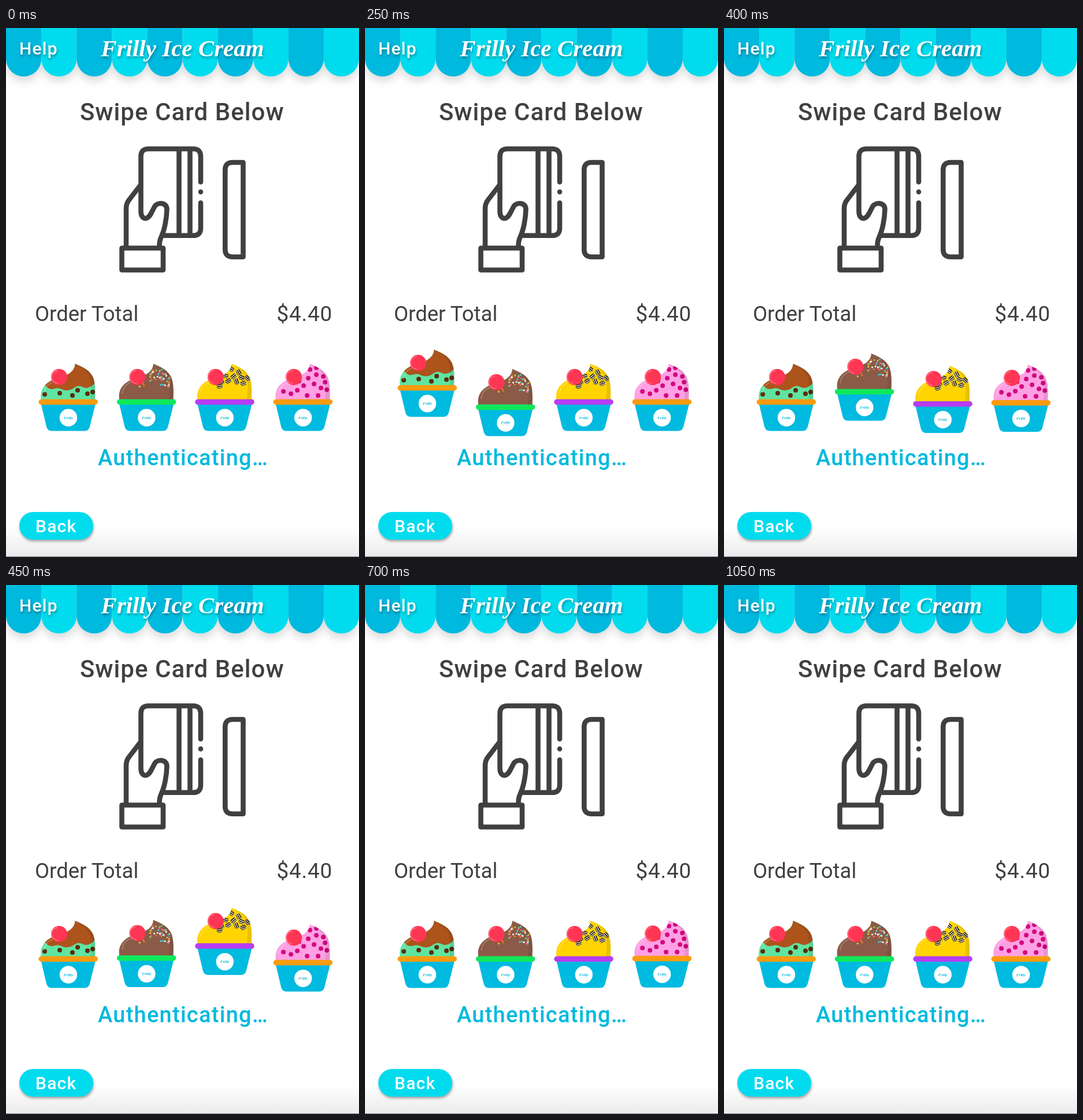
Write an HTML page that moves like this. It is 611 by 917 pixels and loops after 1100 ms.

```html
<!DOCTYPE html>
<html lang="en">
<head>
<meta charset="utf-8">
<title>Ice cream checkout</title>
<style>
html, body { margin: 0; width: 100%; height: 100%; overflow: hidden; background: #fff }
svg { display: block; width: 611px; height: 917px; font-family: Roboto, sans-serif; fill: #404042 }
.bold { font-weight: 500 }
.brand { font-family: "Liberation Serif", serif; font-weight: bold; font-style: italic; text-anchor: middle }
.shade { filter: drop-shadow(1px 3px 2px #0005) }
.icon { fill: none; stroke: #404042; stroke-width: 8.6; stroke-linejoin: round; stroke-linecap: round }
</style>
</head>
<body>
<svg viewBox="0 0 611 917">
  <defs>
    <linearGradient id="floor" x2="0" y2="1">
      <stop stop-color="#fff"/><stop offset="1" stop-color="#ebebeb"/>
    </linearGradient>
    <path id="scoop" d="M61 646C57 625 70 613 87 608C106 603 119 596 119.500 582C134 588 144 593 150 604C155 614 155 630 154 646Z"/>
    <clipPath id="inScoop"><use href="#scoop"/></clipPath>
  </defs>
  <rect width="611" height="917" fill="#fff"/>
  <rect y="866" width="611" height="51" fill="url(#floor)"/>
  <rect y="916" width="611" height="1" fill="#777"/>

  <g id="awning" style="filter:drop-shadow(0 9px 7px #0002)"></g>
  <g class="shade" fill="#fff">
    <text class="bold" x="23" y="46" font-size="30" letter-spacing="1.2">Help</text>
    <text class="brand" x="305.500" y="49" font-size="41">Frilly Ice Cream</text>
  </g>

  <text class="bold" x="128" y="159.500" font-size="42" letter-spacing="1">Swipe Card Below</text>

  <g class="icon">
    <path d="M337 267V222.500Q337 209.500 324 209.500H246.500Q233.500 209.500 233.500 222.500V318C233.500 327 238 330.500 242 330C249 329 252 319 257 310C261 302 278 301 278.500 314C278 332 274 350 270 359C267 366 265.500 369 265.500 379"/>
    <path d="M275 359.800H324Q337 359.800 337 347V303M299.500 211V358M318.500 211V358M337 284v.1"/>
    <path d="M233 272L213 298Q208 304 208 313V379"/>
    <path d="M200.500 381.500H272V419.500H200.500Z"/>
    <path d="M410.500 233H392Q379.300 233 379.300 246V384Q379.300 396.700 392 396.700H410.500Z"/>
  </g>

  <text x="50" y="507.500" font-size="36.500">Order Total</text>
  <text x="565" y="507.500" font-size="37" letter-spacing=".7" text-anchor="end">$4.40</text>

  <g id="cups"></g>

  <text class="bold" x="159" y="758" font-size="38" letter-spacing="1.25" fill="#00b9de">Authenticating…</text>

  <rect class="shade" x="23" y="839" width="128" height="48" rx="24" fill="#00dcee"/>
  <text class="bold" x="51" y="874" font-size="30" letter-spacing="1.2" fill="#fff">Back</text>
</svg>
<script>
const BLUE = '#00b9de', CYAN = '#00dcee';
const find = id => document.getElementById(id);
const dot = (x, y, r, fill) => `<circle cx="${x}" cy="${y}" r="${r}" fill="${fill}"/>`;
const dots = (points, r, fill) => points.map(([x, y]) => dot(x, y, r, fill)).join('');

find('awning').innerHTML = Array.from({ length: 10 }, (_, i) =>
  `<path fill="${i % 2 ? CYAN : BLUE}" d="M${i * 61.1} 0h61.2v53.500a30.600 30.600 0 0 1-61.200 0z"/>`).join('');

let seed = 7;
const random = () => (seed = seed * 16807 % 2147483647) / 2147483647;

function sprinkles() {
  const colors = ['#ffd23c', '#ff5d9e', '#40d8e8', '#7be06a', '#fff', '#f57c2a'];
  return Array.from({ length: 52 }, (_, i) => {
    const x = 96 + random() * 55;
    return dot(x, 587 + Math.abs(x - 120) * .25 + random() * 31, 1.5, colors[i % 6]);
  }).join('');
}

const cookies = [[119, 591, 40], [109, 603, 15], [123, 604, -40], [132, 597, 60], [137, 606, 25],
  [114, 612, -30], [128, 613, 70], [140, 616, -20], [102, 613, 60], [99, 621, -15], [147, 607, 40]];
const cookie = ([x, y, a]) => `<g transform="translate(${x} ${y}) rotate(${a})">
  <rect x="-5" y="-3.500" width="10" height="7" rx="2" fill="#1c1613"/>
  <path d="M-5-1.200H5M-5 1.800H5" stroke="#fff3cf" stroke-width="1.300"/></g>`;

const chips = [[67, 635], [93, 633], [115, 637], [124, 628], [141, 634], [150, 631]];
const berries = [[120, 592], [131, 589], [117, 607], [131, 601], [143, 604], [109, 620], [127, 617], [139, 624],
  [149, 627], [74, 630], [87, 634], [98, 628], [115, 637], [134, 637], [146, 614], [101, 612]];

const flavours = [
  ['#5fe4a2', '#f99b0f', dots(chips, 4, '#5b2c0d') +
    '<path fill="#ad531c" d="M66 617Q74 629 84 625Q91 623 96 626Q107 631 116 625Q125 617 134 623Q145 627 156 613V575H80Z"/>'],
  ['#8b5b47', '#10e85b', sprinkles()],
  ['#ffd400', '#b63df2', cookies.map(cookie).join('')],
  ['#ffa0e4', '#f99b0f', dots(berries, 4, '#d20a80')]
];

const cups = find('cups');
cups.innerHTML = flavours.map(([color, rim, topping]) => `<g>
  <use href="#scoop" fill="${color}"/>
  <g clip-path="url(#inScoop)">${topping}
    <path d="M119.500 582C148 596 150 612 146 646H157V580Z" fill="#000" opacity=".09"/>
    <path d="M66 634C66 624 73 616 84 613" fill="none" stroke="#fff" stroke-width="1.500" opacity=".25"/>
  </g>
  ${dot(92, 605, 14, '#ff3653')}
  <path d="M90 594A11 11 0 0 0 90 616" fill="none" stroke="#ff7085" stroke-width="1.500"/>
  <path d="M60.500 651H155L145 691Q143 698.500 136 698.500H79Q72 698.500 70 691Z" fill="#00bae0"/>
  <rect x="56.500" y="643.500" width="102.500" height="9.500" rx="4.750" fill="${rim}"/>
  ${dot(108, 675.5, 15.2, '#fff')}
  <text class="brand" x="108" y="677.500" font-size="7" fill="${BLUE}">Frilly</text>
</g>`).join('');

// Dip, leap, brief hang, then land: [time, offset]
const hop = [[0, 0], [132, 9], [222, -25], [240, -25], [345, 0]];
function offset(t) {
  const k = hop.findIndex(([end]) => t < end);
  if (k < 1) return 0;
  const [t0, y0] = hop[k - 1], [t1, y1] = hop[k];
  return y0 + (y1 - y0) * (1 - Math.cos(Math.PI * (t - t0) / (t1 - t0))) / 2;
}

const start = performance.now();
function draw() {
  const t = Math.floor((performance.now() - start) % 1100 / 50) * 50;
  [...cups.children].forEach((cup, i) =>
    cup.setAttribute('transform', `translate(${i * 135.4} ${offset(t - i * 122)})`));
  requestAnimationFrame(draw);
}
draw();
</script>
</body>
</html>
```
